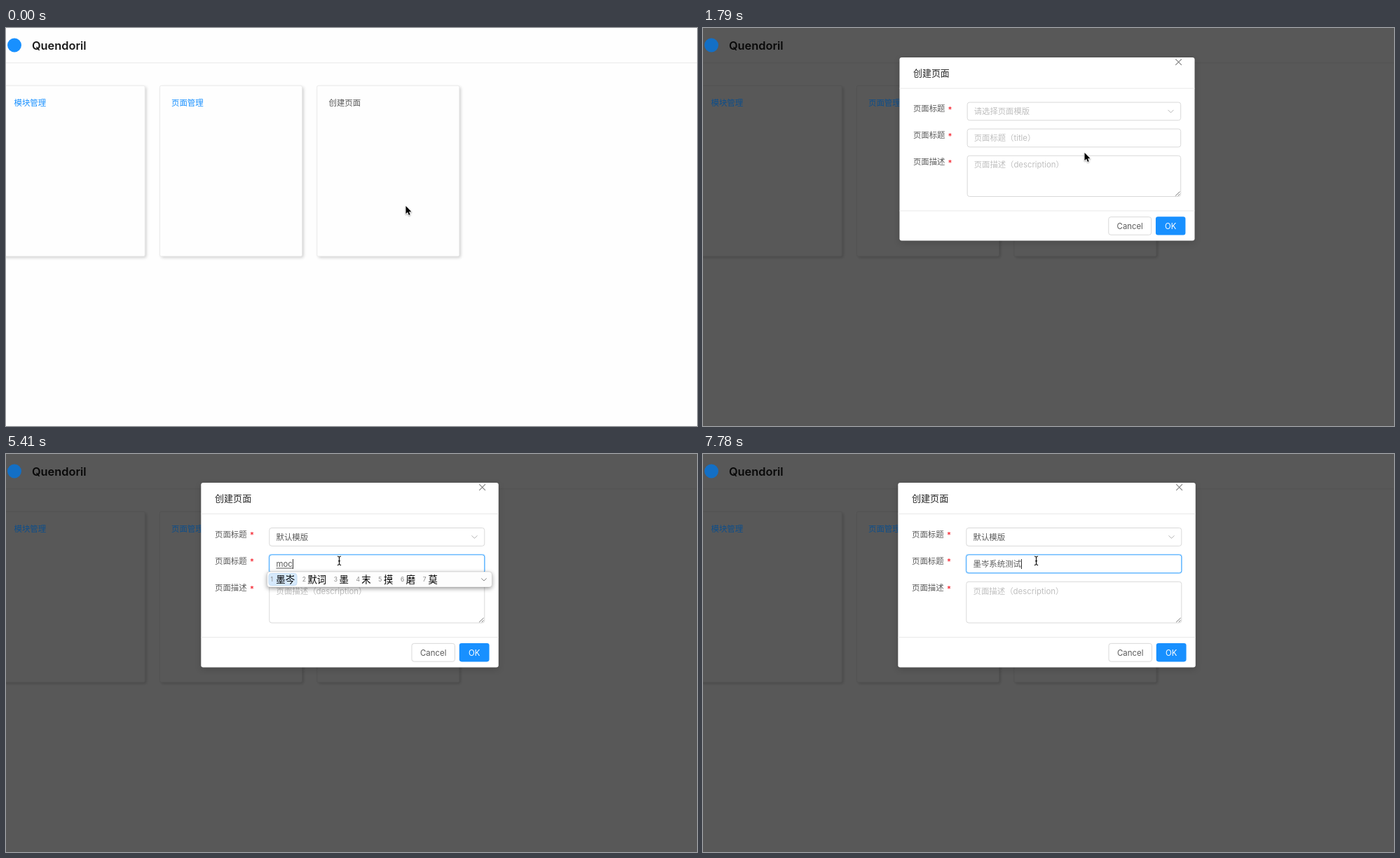
An HTML page with a canvas that plays this animation: 986x568 px, repeating every 8 s.

```html
<!DOCTYPE html>
<html lang="zh-CN">
<head>
<meta charset="utf-8">
<title>创建页面</title>
<style>
html, body { margin: 0; width: 100%; height: 100%; overflow: hidden; background: #fefefe; }
canvas { display: block; width: 986px; height: 568px; }
</style>
</head>
<body>
<canvas id="stage" width="986" height="568"></canvas>
<script>
const ctx = document.getElementById('stage').getContext('2d');
const W = 986, H = 568, LOOP = 8000;
const FAMILY = "Inter, 'Noto Sans CJK SC', 'Noto Sans CJK', sans-serif";
const BODY = 11.43;
const INK = 'rgba(0,0,0,.65)', HINT = '#bfbfbf', LINE = '#d9d9d9', FOCUS = '#40a9ff';

// time, scale, opacity, mask
const MODAL = [[0, 0, 0, 0], [1640, .848, .79, .3], [1790, .992, 1, .65], [1970, 1, 1, .65]];

// time, shape, x, y
const POINTER = [
  [0, 'arrow', 570.5, 254], [600, 'arrow', 557, 241], [750, 'arrow', 532, 215],
  [890, 'arrow', 511, 191], [1040, 'arrow', 528, 182], [1190, 'arrow', 544.5, 178],
  [2120, 'beam', 539, 164], [2270, 'beam', 526, 149], [2430, 'hand', 508, 124],
  [2590, 'hand', 496, 114], [3030, 'hand', 494, 133], [3180, 'hand', 494, 146],
  [3780, 'beam', 492, 152], [3930, 'beam', 482, 152], [4080, 'beam', 475.5, 152]
];

// time, select open amount
const MENU = [[0, 0], [2730, .4], [2880, 1], [3480, .5], [3630, 0]];

// time, committed text, composing letters, candidates, popup width
const TYPING = [
  [0, '', ''],
  [4820, '', 'm', '吗 没 们 买 慢 忙 美 每 名'],
  [4970, '', 'mo', '墨 末 摸 磨 莫 默 模 抹 魔'],
  [5410, '', 'moc', '墨岑 默词 墨 末 摸 磨 莫'],
  [5560, '', 'mocen', '墨岑 莫岑 末岑 墨 末 摸 磨'],
  [5860, '墨岑', ''],
  [6150, '墨岑', 'x', '想 下 小 西 些 先 写 新 行'],
  [6300, '墨岑', 'xi', '洗 系 西 细 戏 喜 夕 希 袭'],
  [6440, '墨岑', 'xit', '系统 洗头 细听 洗 系 西 细'],
  [6590, '墨岑', 'xitong', '系统 洗 系 西 细 戏 喜 夕'],
  [6740, '墨岑系统', ''],
  [7190, '墨岑系统', 'c', '从 才 次 出 错', 191],
  [7490, '墨岑系统', 'ces', '测试 测算 侧视 测 策 册 侧'],
  [7640, '墨岑系统', 'ceshi', '测试 侧视 侧室 测 策 册 侧'],
  [7780, '墨岑系统测试', '']
];

const SHAPES = {
  arrow: new Path2D('M0 0V11.2L2.6 8.8L4.4 13L6.2 12.2L4.5 8.2H8Z'),
  hand: new Path2D('M3 8L1.4 6.2Q-.6 5.6 .2 7.2L3 11.4L4 14H10L11 10V6.6Q10.5 5.1 9.3 6Q8.8 4.6 7.5 5.4Q7 4.2 5.4 5V1.2Q4.2-.6 3 1.2Z'),
  beam: new Path2D('M-2.6-6Q-.4-6 0-4.6Q.4-6 2.6-6M0-4.6V5.4M-1.6 .8H1.6M-2.6 6.6Q-.4 6.6 0 5.2Q.4 6.6 2.6 6.6')
};

const pick = (rows, t) => rows.reduce((best, row) => row[0] <= t ? row : best);
const blue = k => `rgb(${24 * k},${144 * k},${255 * k})`;

function setFont(size, weight = 400) {
  ctx.font = `${weight} ${size}px ${FAMILY}`;
}

function text(s, x, cy, color, size = BODY, weight = 400, align = 'left') {
  setFont(size, weight);
  ctx.textAlign = align;
  ctx.fillStyle = color;
  ctx.fillText(s, x, cy + size * .37);
}

function box(x, y, w, h, r, fill, stroke) {
  ctx.beginPath();
  ctx.roundRect(x, y, w, h, r);
  if (fill) { ctx.fillStyle = fill; ctx.fill(); }
  if (stroke) { ctx.strokeStyle = stroke; ctx.lineWidth = 1; ctx.stroke(); }
}

function shadowBox(x, y, w, h, r, fill, blur, dx, dy, color) {
  ctx.save();
  ctx.shadowColor = color;
  ctx.shadowBlur = blur;
  ctx.shadowOffsetX = dx;
  ctx.shadowOffsetY = dy;
  box(x, y, w, h, r, fill);
  ctx.restore();
}

function lines(color, width, ...paths) {
  ctx.strokeStyle = color;
  ctx.lineWidth = width;
  ctx.beginPath();
  for (const [x, y, ...rest] of paths) {
    ctx.moveTo(x, y);
    for (let i = 0; i < rest.length; i += 2) ctx.lineTo(rest[i], rest[i + 1]);
  }
  ctx.stroke();
}

function chevron(x, y, size, dir, color) {
  const h = size * .5 * dir;
  lines(color, 1, [x - size, y - h, x, y + h, x + size, y - h]);
}

function field(y, h, focused) {
  if (focused) box(374.5, y - 1, 309.5, h + 2, 4, 'rgba(24,144,255,.3)');
  box(375.8, y, 307, h, 3.3, '#fff', focused ? FOCUS : LINE);
}

function drawPage(mask) {
  ctx.fillStyle = '#fefefe';
  ctx.fillRect(0, 0, W, H);
  ctx.fillStyle = '#e8e8e8';
  ctx.fillRect(0, 49.3, W, 1);
  for (let i = 0; i < 3; i++) {
    const x = -4.8 + i * 224.3;
    shadowBox(x, 82.3, 203, 243.5, 2, '#fefefe', 4, 2, 2, 'rgba(0,0,0,.2)');
    box(x, 82.3, 203, 243.5, 2, '#fefefe', '#ebebeb');
  }
  text('创建页面', 460.5, 107, INK);

  ctx.fillStyle = `rgba(0,0,0,${mask})`;
  ctx.fillRect(0, 0, W, H);

  const link = blue(1 - mask * .7);
  text('模块管理', 11.5, 107, link);
  text('页面管理', 236, 107, link);
  text('Quendoril', 37, 24.5, 'rgba(0,0,0,.9)', 16.33, 600);
  ctx.fillStyle = blue(1 - mask * .35);
  ctx.beginPath();
  ctx.arc(12, 24.5, 10, 0, 7);
  ctx.fill();
}

function drawMenu(open) {
  ctx.save();
  ctx.globalAlpha *= open;
  shadowBox(376, 134.5, 307, 26.5, 3, '#e6f7ff', 5, 0, 1.5, 'rgba(0,0,0,.2)');
  text('默认模版', 385.5, 148, INK);
  ctx.restore();
}

function drawEntry(t, done, raw) {
  if (!done && !raw) {
    text('页面标题（title）', 385.5, 157, HINT);
  } else {
    text(done + raw, 385.5, 156.8, INK);
  }
  setFont(BODY);
  const start = 385.5 + ctx.measureText(done).width;
  const end = start + ctx.measureText(raw).width;
  if (raw) lines('#555', 1, [start, 163, end, 163]);
  if (t >= 4230 && !(t >= 4530 && t < 4820)) {
    ctx.fillStyle = '#333';
    ctx.fillRect(Math.round(end - .3), 150, 1, 14);
  }
  return start;
}

// Returns the x where composing text begins.
function drawModal(t, scale, alpha, done, raw) {
  const open = pick(MENU, t)[1];
  const chosen = t >= 3480;
  const selFocus = t >= 2730 && t < 4230;
  ctx.save();
  ctx.globalAlpha = alpha;
  ctx.translate(545, 178.5);
  ctx.scale(scale, scale);
  ctx.translate(-545, -178.5);

  shadowBox(278.3, 41, 424.5, 263.5, 3.3, '#fff', 10, 0, 3, 'rgba(0,0,0,.15)');
  lines('#e8e8e8', 1, [278.3, 85.4, 702.8, 85.4], [278.3, 261.6, 702.8, 261.6]);
  text('创建页面', 298, 63.2, 'rgba(0,0,0,.85)', 13.07, 500);
  lines('#808080', 1.1, [675.3, 43.2, 684, 51.9], [684, 43.2, 675.3, 51.9]);

  ['页面标题', '页面标题', '页面描述'].forEach((label, i) => {
    const y = 114.6 + i * 38.3;
    text(label, 298, y, INK);
    text('*', 348, y + 1.3, '#f5222d', BODY, 500);
  });

  field(105.5, 25.8, selFocus);
  text(chosen ? '默认模版' : '请选择页面模版', 385.5, 118.5, chosen ? INK : HINT);
  chevron(668.5, 118.4, 4, open && !chosen ? -1 : 1, '#b5b5b5');

  field(143.8, 26, t >= 4230);
  const start = drawEntry(t, done, raw);

  field(182.3, 58.7);
  text('页面描述（description）', 385.5, 195.3, HINT);
  lines('#666', .9, [675.2, 240, 681.6, 234], [678.8, 240, 681.6, 237.4]);

  box(579, 270.4, 61.5, 25.8, 3.3, '#fff', LINE);
  text('Cancel', 609.7, 284, INK, BODY, 400, 'center');
  box(646.8, 270, 42.8, 26.4, 3.3, '#1890ff');
  text('OK', 668.2, 284, '#fff', BODY, 400, 'center');

  if (open) drawMenu(open);
  ctx.restore();
  return start;
}

function drawCandidates(start, list, width = 321) {
  const left = start - 13;
  shadowBox(left, 168, width, 22, 4, '#fff', 6, 0, 2, 'rgba(0,0,0,.4)');
  box(left, 168, width, 22, 4, '#fdfdfd', 'rgba(0,0,0,.12)');
  let x = left + 5;
  list.split(' ').forEach((word, i) => {
    const size = 13.4 * word.length;
    if (!i) box(x - 2.5, 170.5, size + 13.2, 17, 3.5, '#d6e9fc', '#c3dcf3');
    text(i + 1, x, 179, '#8a8a8a', 8.6);
    text(word, x + 7.8, 179, '#000', 13.4, 500);
    x += size + 18.35;
  });
  chevron(left + width - 11.5, 179.2, 3.7, 1, '#888');
}

function drawPointer(kind, x, y) {
  const path = SHAPES[kind];
  ctx.save();
  ctx.translate(x, y);
  ctx.lineJoin = 'round';
  if (kind === 'beam') {
    ctx.strokeStyle = 'rgba(255,255,255,.9)';
    ctx.lineWidth = 2.6;
    ctx.stroke(path);
    ctx.strokeStyle = '#000';
    ctx.lineWidth = 1.1;
    ctx.stroke(path);
  } else {
    const arrow = kind === 'arrow';
    ctx.shadowColor = 'rgba(0,0,0,.35)';
    ctx.shadowBlur = 2;
    ctx.shadowOffsetY = 1;
    ctx.strokeStyle = arrow ? '#fff' : '#000';
    ctx.lineWidth = arrow ? 1.6 : 2;
    ctx.stroke(path);
    ctx.shadowColor = 'transparent';
    ctx.fillStyle = arrow ? '#000' : '#fff';
    ctx.fill(path);
    if (!arrow) lines('#000', .8, [5.5, 9, 5.5, 12], [7.3, 9, 7.3, 12], [9.1, 9, 9.1, 12]);
  }
  ctx.restore();
}

function frame(now) {
  const t = now % LOOP;
  const [, scale, alpha, mask] = pick(MODAL, t);
  const [, done, raw, list, width] = pick(TYPING, t);
  const [, kind, x, y] = pick(POINTER, t);
  drawPage(mask);
  if (scale) {
    const start = drawModal(t, scale, alpha, done, raw);
    if (list) drawCandidates(start, list, width);
  }
  drawPointer(kind, x, y);
  requestAnimationFrame(frame);
}
requestAnimationFrame(frame);
</script>
</body>
</html>
```
